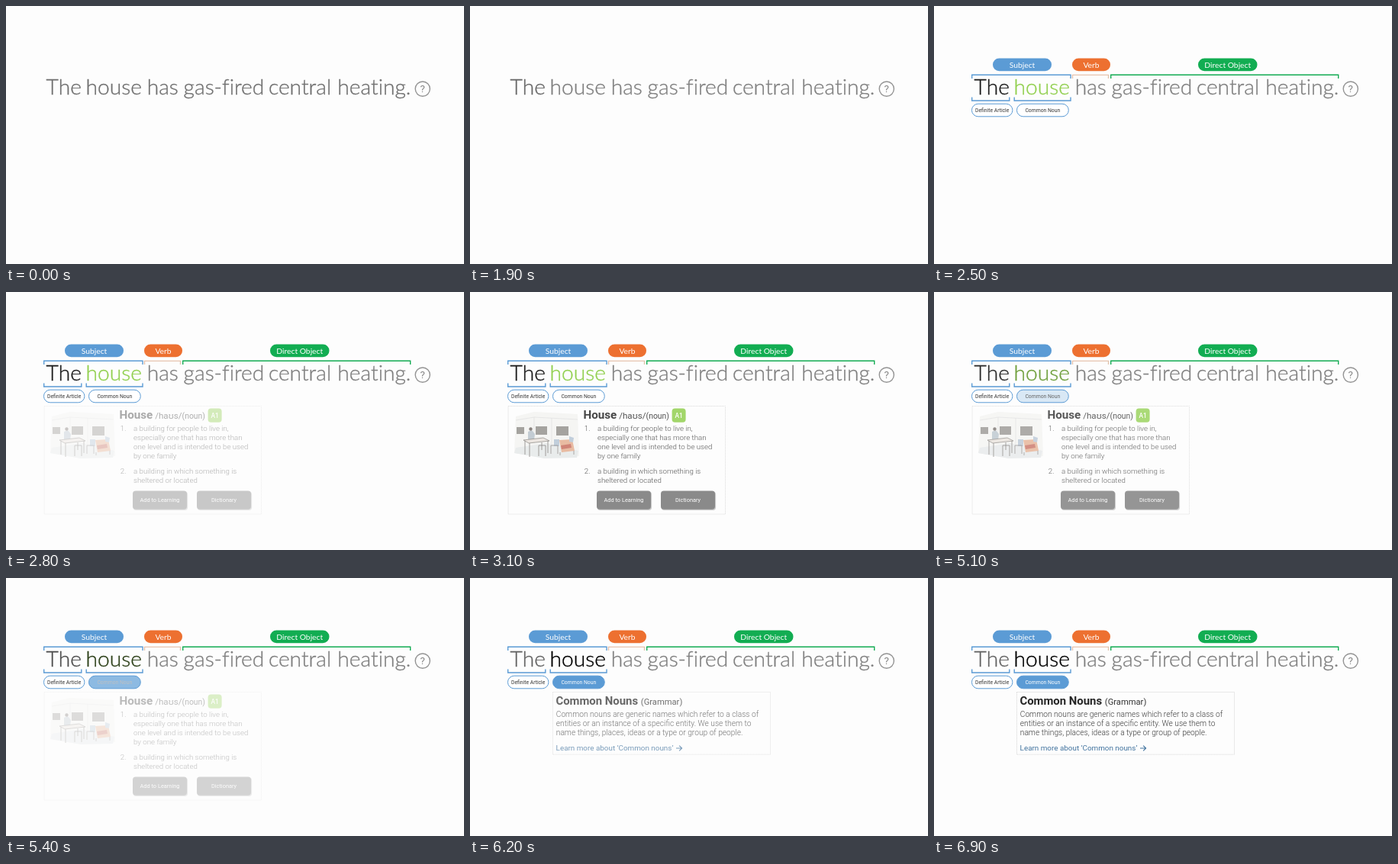
Write an HTML page that moves like this. It is 600 by 338 pixels and loops after 8 s.

```html
<!DOCTYPE html>
<html lang="en">
<head>
<meta charset="utf-8">
<title>Sentence grammar</title>
<style>
  html, body { margin: 0; width: 100%; height: 100%; overflow: hidden; background: #fdfdfd; }
  svg { display: block; width: 100vw; height: 100vh; font-family: Roboto, sans-serif; }
  .sentence { font: 300 28.2px Lato, sans-serif; font-variant-ligatures: none; }
  .sentence text { fill: currentColor; stroke: currentColor; stroke-width: .35; }
  .tag { font: 400 10.3px Lato, sans-serif; fill: #fff; text-anchor: middle; }
  .pill { font-size: 6.8px; fill: #333; text-anchor: middle; }
  .button { font-size: 7.4px; fill: #fff; text-anchor: middle; }
  .head { font-weight: 700; fill: #262626; }
  .note { fill: #333; }
  .body { font-weight: 300; fill: #3c3c3c; }
  .frame { fill: #fdfdfd; stroke: #c9c9c9; stroke-width: .8; stroke-dasharray: 1 1; }
  .line { fill: none; stroke-width: 1.4; }
</style>
</head>
<body>
<svg viewBox="0 0 600 338">
  <g id="sentence" class="sentence">
    <text id="the" x="52.6" y="116.4">The</text>
    <text id="house" x="104.5" y="116.4">house</text>
    <text x="184.7" y="116.4">has</text>
    <text x="232.6" y="116.4">gas-fired</text>
    <text x="343.9" y="116.4">central</text>
    <text x="434.3" y="116.4">heating.</text>
  </g>
  <circle cx="545.8" cy="108.6" r="9.6" fill="none" stroke="#949494" stroke-width="1.4"/>
  <text x="545.8" y="113.4" font-size="13.5" fill="#858585" text-anchor="middle">?</text>

  <g id="labels">
    <g id="tags"></g>
    <path class="line" stroke="#5b9bd5" d="M49.7 95V90.2H179V95 M49.7 119.5V124H98.8V119.5 M105.2 119.5V124H179V119.5"/>
    <path class="line" stroke="#e6c3ae" stroke-width="1" d="M181.5 95V90.4H228.5V95"/>
    <path class="line" stroke="#12ab52" d="M231.7 95V90.2H529.7V95"/>
    <rect x="49.5" y="128.2" width="53.4" height="16.6" rx="8.3" fill="#fff" stroke="#5b9bd5"/>
    <text class="pill" x="76.2" y="138.9">Definite Article</text>
    <rect id="nounPill" x="108.5" y="128.2" width="67.8" height="16.6" rx="8.3" stroke="#5b9bd5"/>
    <text id="nounText" class="pill" x="142.3" y="138.9">Common Noun</text>
  </g>

  <g id="houseCard">
    <rect class="frame" x="50" y="149.5" width="284.5" height="141.5"/>
    <g id="room">
      <path fill="#f4f4f2" d="M60 163L84 157L141 160L143 215L98 218L58 211Z"/>
      <path fill="#e6e9ea" d="M60 204L100 198L142 208L140 217L98 218L58 211Z"/>
      <path fill="#96938f" d="M86 176H101V187H86Z M113 176H129V188H113Z M61 177H71V186H61Z"/>
      <path fill="none" stroke="#dcdcdc" stroke-width=".7" d="M60 168L84 164L141 167 M84 164V198 M107 165V200"/>
      <path fill="#b9c4cc" d="M76 183L81 181L85 186L84 193H76Z"/>
      <circle cx="79.5" cy="179.5" r="2.2" fill="#77706b"/>
      <path fill="#e9e3dc" stroke="#77736f" stroke-width=".7" d="M70 194L96 191L104 195L77 198Z"/>
      <path fill="none" stroke="#77736f" stroke-width=".8" d="M72 195V213 M78 198V216 M102 195V211 M94 197V207 M90 215V201H99V215"/>
      <path fill="#e5b092" d="M117 194L134 193L137 208L120 210Z"/>
      <path fill="#c86f60" d="M119 201L132 199L133 204L120 206Z"/>
      <path fill="#b7c6d6" d="M110 193H117V202H110Z M130 189L136 191L135 197L130 196Z"/>
      <path fill="none" stroke="#8a8580" stroke-width=".8" d="M118 210V214 M136 208V213 M106 201H115V212 M106 201V212"/>
    </g>
    <text class="head" x="148.4" y="166" font-size="15.2">House</text>
    <text class="note" x="195.2" y="166" font-size="11.6">/haʊs/</text>
    <text class="note" x="230.6" y="166" font-size="10.4">(noun)</text>
    <rect x="264.6" y="152.4" width="18" height="18.4" rx="4" fill="#92d050"/>
    <text x="273.6" y="164.6" font-size="8.4" font-weight="500" fill="#fff" text-anchor="middle">A1</text>
    <g id="meanings" class="body" font-size="9.7"></g>
    <g id="buttons"></g>
  </g>

  <g id="nounCard">
    <rect class="frame" x="108.5" y="149.5" width="285" height="81.7"/>
    <text class="head" x="112.4" y="165.6" font-size="14.9">Common Nouns</text>
    <text class="note" x="223.8" y="165.6" font-size="11.2">(Grammar)</text>
    <g id="grammar" class="body" font-size="10.2"></g>
    <text x="112.6" y="226.2" font-size="9.87" fill="#43749f">Learn more about ‘Common nouns’</text>
    <path fill="none" stroke="#43749f" stroke-width="1.1" d="M270 223H277.6 M274.2 219.6L277.6 223L274.2 226.4"/>
  </g>
</svg>
<script>
const $ = id => document.getElementById(id);

function add(parent, name, attrs, text = "") {
  const el = document.createElementNS("http://www.w3.org/2000/svg", name);
  for (const key in attrs) el.setAttribute(key, attrs[key]);
  el.textContent = text;
  $(parent).append(el);
}

function lines(parent, x, y, step, rows) {
  rows.forEach((row, i) => add(parent, "text", { x, y: y + i * step }, row));
}

const tags = [
  ["Subject", 77, 77, "#5b9bd5"],
  ["Verb", 181, 50, "#ed7030"],
  ["Direct Object", 346, 77.5, "#12ad52"]
];
for (const [text, x, width, fill] of tags) {
  add("tags", "rect", { x, y: 68.6, width, height: 16.6, rx: 8.3, fill });
  add("tags", "text", { class: "tag", x: x + width / 2, y: 80.6 }, text);
}

for (const [text, x] of [["Add to Learning", 166], ["Dictionary", 250]]) {
  add("buttons", "rect", { x: x + .6, y: 261.6, width: 71.5, height: 24.5, rx: 4, fill: "#c4c4c4" });
  add("buttons", "rect", { x, y: 260.4, width: 71, height: 24.4, rx: 4, fill: "#767676" });
  add("buttons", "text", { class: "button", x: x + 35.5, y: 275.2 }, text);
}

lines("meanings", 149.8, 182.4, 55.8, ["1.", "2."]);
lines("meanings", 167, 182.4, 12, [
  "a building for people to live in,",
  "especially one that has more than",
  "one level and is intended to be used",
  "by one family"
]);
lines("meanings", 167, 238.2, 12, ["a building in which something is", "sheltered or located"]);
lines("grammar", 112.8, 182, 12.2, [
  "Common nouns are generic names which refer to a class of",
  "entities or an instance of a specific entity. We use them to",
  "name things, places, ideas or a type or group of people."
]);

const LOOP = 8000, STEP = 100;
const rgb = (r, g = r, b = r) => [r, g, b];
const REST = rgb(112), DIM = rgb(127), INK = rgb(30), WHITE = rgb(255);
const GREEN = rgb(146, 208, 80), BLUE = rgb(91, 155, 213);

// [element, property, steps of [start, end, from, to]]
const tracks = [
  ["sentence", "color", [[1800, 1900, REST, DIM]]],
  ["the", "color", [[1850, 2400, REST, INK], [4950, 5600, INK, rgb(100)]]],
  ["house", "color", [[1800, 1900, REST, DIM], [1900, 2400, DIM, GREEN], [4950, 5600, GREEN, rgb(0)]]],
  ["labels", "opacity", [[1950, 2500, 0, 1]]],
  ["nounPill", "fill", [[4950, 5600, WHITE, BLUE]]],
  ["nounText", "fill", [[4950, 5600, rgb(51), WHITE]]],
  ["houseCard", "opacity", [[2550, 3200, 0, 1], [4950, 5600, 1, 0]]],
  ["nounCard", "opacity", [[5750, 6400, 0, 1]]]
];

const mix = (a, b, k) => a + (b - a) * k;

function valueAt(steps, t) {
  const [start, end, from, to] = steps.findLast(s => t >= s[0]) || steps[0];
  const k = Math.min(1, Math.max(0, (t - start) / (end - start)));
  return Array.isArray(from)
    ? `rgb(${from.map((c, i) => Math.round(mix(c, to[i], k)))})`
    : mix(from, to, k);
}

const origin = performance.now();
function draw() {
  const t = Math.floor((performance.now() - origin) % LOOP / STEP) * STEP;
  for (const [id, prop, steps] of tracks) $(id).style[prop] = valueAt(steps, t);
  requestAnimationFrame(draw);
}
draw();
</script>
</body>
</html>
```
